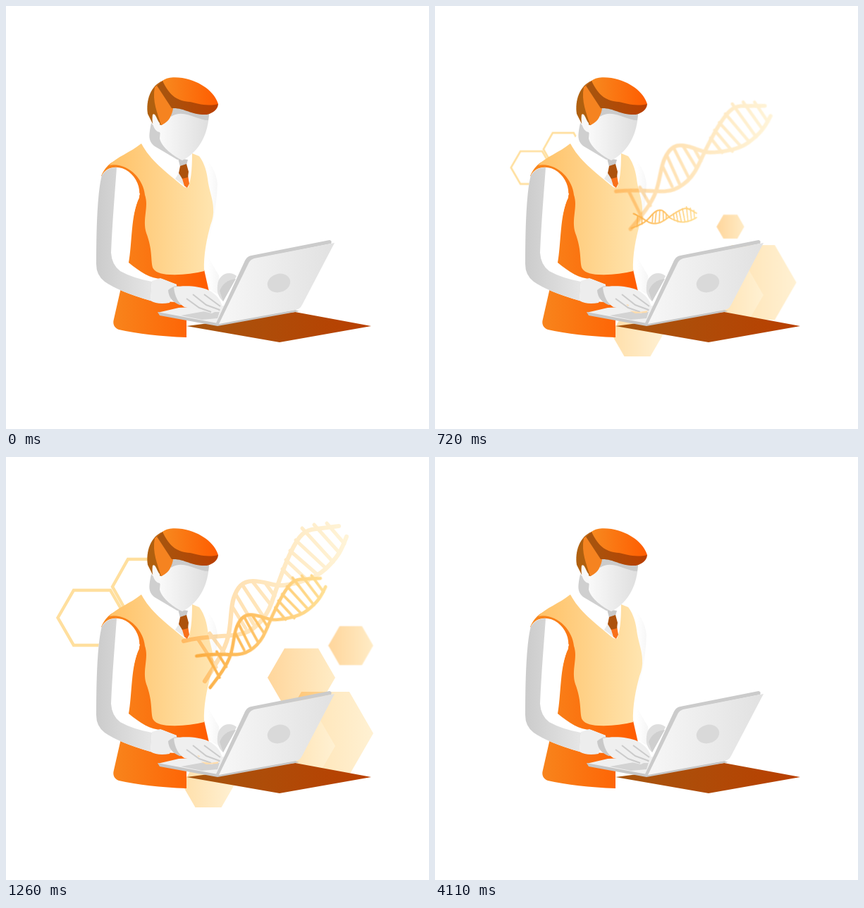
An HTML page that plays this animation: 600x600 px, repeating every 4.5 s.

```html
<!DOCTYPE html>
<html lang="en">
<head>
<meta charset="utf-8">
<title>Researcher at a laptop</title>
<style>
  html, body { margin: 0; width: 100%; height: 100%; overflow: hidden; background: #fff; }
  svg { display: block; width: 100%; height: 100%; }
  .glass { mix-blend-mode: multiply; }
</style>
</head>
<body>
<svg id="stage" viewBox="0 0 600 600">
  <defs>
    <linearGradient id="hexWarm"><stop stop-color="#ffd69c"/><stop offset="1" stop-color="#ffecc6"/></linearGradient>
    <linearGradient id="hexPale"><stop stop-color="#ffdfaa"/><stop offset="1" stop-color="#fff1d3"/></linearGradient>
    <linearGradient id="helixPale" gradientUnits="userSpaceOnUse" x1="252" x2="484" y1="0" y2="0">
      <stop stop-color="#ffd9a3"/><stop offset="1" stop-color="#fff4d8"/></linearGradient>
    <linearGradient id="helixGold" gradientUnits="userSpaceOnUse" x1="252" x2="484" y1="0" y2="0">
      <stop stop-color="#fbac40"/><stop offset=".5" stop-color="#ffc66c"/><stop offset="1" stop-color="#ffe096"/></linearGradient>
    <linearGradient id="vest"><stop stop-color="#ffc166"/><stop offset="1" stop-color="#ffe5b0"/></linearGradient>
    <linearGradient id="orange"><stop stop-color="#f7891f"/><stop offset="1" stop-color="#ff5c00"/></linearGradient>
    <linearGradient id="brown"><stop stop-color="#a6560f"/><stop offset="1" stop-color="#b93f00"/></linearGradient>
    <linearGradient id="face"><stop stop-color="#fafafa"/><stop offset="1" stop-color="#dedede"/></linearGradient>
    <linearGradient id="shade"><stop stop-color="#cbcbcb"/><stop offset="1" stop-color="#e6e6e6"/></linearGradient>
    <linearGradient id="lid"><stop stop-color="#f7f7f7"/><stop offset="1" stop-color="#e1e1e1"/></linearGradient>
    <linearGradient id="sleeve"><stop offset=".5" stop-color="#fff"/><stop offset="1" stop-color="#f5f5f5"/></linearGradient>

    <g id="helix" fill="none" stroke-linecap="round">
      <path stroke-width="5" d="M272 258L298 298M289 250L309 277M322 214L340 243M326 195L351 237
        M335 181L364 225M350 177L375 209M368 179L381 197
        M392 159L413 180M397 146L429 176M403 133L442 167M411 118L454 158M420 101L464 149M437 96L473 136M455 94L480 123"/>
      <path stroke-width="6.2" d="M252 261C285 253 309 255 329 252S368 232 377 206S392 160 404 135S424 103 440 102L472 98
        M282 318C297 295 310 275 315 255S318 215 323 200S335 176 350 176S375 181 386 182S435 176 453 159S476 132 483 113"/>
    </g>
  </defs>

  <g id="hexes"></g>
  <g id="rings" fill="none" stroke="#ffdf9e" stroke-width="4.4"></g>

  <g id="person">
    <path fill="url(#sleeve)" d="M270 208C286 215 298 232 300 252C299 290 290 320 284 352L302 382L303 410L284 400L270 300Z"/>
    <path fill="url(#orange)" d="M135 241C140 230 146 223 156 219L178 224L205 260L212 372L281 374L288 405L256 440V470Q200 468 160 459Q150 455 153 444L163 400L174 362C174 320 181 292 190 266Z"/>
    <path fill="url(#vest)" d="M192 195C176 208 157 214 146 226C172 221 195 245 197 268C203 285 193 302 199 322C208 346 205 358 208 371Q212 380 232 381Q258 382 281 376C280 352 285 330 290 311Q295 298 294 288C294 274 288 262 286 245C284 230 279 219 274 213L264 209L258 258Z"/>
    <path fill="#fff" d="M204 180L192 195C204 218 226 235 253 257L258 258Q264 245 264 210L250 217Z"/>
    <path fill="#e9e9e9" d="M247 234L240 245L254 256L251 244Z"/>
    <path fill="#c9c9c9" d="M244 216L258 218L256 225L247 228Z"/>
    <path fill="#f9701a" d="M249 242L258 240L260 252L257 258L253 255Z"/>
    <path fill="#ad520d" d="M247 227L256 224L259 235L258 243L250 245L245 237Z"/>

    <path fill="#cfcfcf" d="M206 166C202 185 202 192 211 199L243 218L252 216L226 188Z"/>
    <path fill="url(#face)" d="M220 164L234 145L288 152C287 178 277 205 250 219C238 213 221 201 218 188Z"/>
    <path fill="#cbcbcb" d="M232 145L250 143L288 153L287 162C270 162 252 145 234 157Z"/>
    <path fill="#b0600f" d="M223 106C205 112 198 135 201 153L208 167L221 169L235 148L232 120Z"/>
    <path fill="#f58320" d="M211 115L222 106L237 146C234 160 228 166 220 169C215 152 207 135 211 115Z"/>
    <path fill="url(#brown)" d="M222 106L301 139Q300 150 285 154C262 155 254 144 235 145L214 113Z"/>
    <path fill="url(#orange)" d="M222 106C230 100 241 101 250 102C277 107 296 122 301 139C285 143 270 138 261 136C244 135 232 128 222 106Z"/>
    <path fill="#f8f8f8" d="M208 154C212 150 214 162 218 166L219 179C211 179 206 168 208 154Z"/>

    <path fill="#fff" d="M136 240C143 227 161 225 174 235C185 244 191 256 189 272C177 295 179 338 174 364C190 377 205 387 221 387L242 395V420L205 418Q160 405 140 391Q128 382 128 366Q128 270 136 240Z"/>
    <path fill="url(#shade)" d="M136 240Q145 228 157 229C154 270 151 305 149 350Q150 367 162 376Q180 386 207 391L205 418Q160 405 140 391Q128 382 128 366Q128 270 136 240Z"/>
    <path fill="#ededed" d="M207 390L219 386L242 395L232 421Q215 424 205 418Z"/>
  </g>

  <path fill="url(#brown)" d="M256 454L410 434L518 454L388 477Z"/>
  <g id="laptop">
    <path fill="#dedede" d="M300 397C301 379 318 375 327 383L308 419C301 412 299 406 300 397Z"/>
    <path fill="#cfcfcf" d="M303 404Q309 389 326 387L308 419Z"/>
    <path fill="#f0f0f0" d="M215 435L245 428L312 425L300 453Z"/>
    <path fill="#c6c6c6" d="M215 434L300 450L410 431L416 433L300 454L218 439Z"/>
    <path fill="#d3d3d3" d="M248 439L276 434L304 430L300 443L278 445Z"/>
    <path fill="#c9c9c9" d="M230 403Q239 395 247 398L262 424L246 424Q231 418 230 403Z"/>
    <path fill="#efefef" d="M238 399C252 396 274 397 287 403C299 409 305 417 307 428Q302 431 299 429L304 434L296 434L292 436Q268 430 253 427Q240 419 238 399Z"/>
    <path fill="none" stroke="#cbcbcb" stroke-width="2" d="M265 409L284 424L303 431M281 409L304 426M256 415L274 428L291 434"/>
    <path fill="#cbcbcb" d="M297 452L339 361Q342 355 348 354L459 332Q463 333 461 337L351 359L304 452Z"/>
    <path fill="url(#lid)" d="M302 451L344 365Q346 360 352 358L466 336L420 424Q417 430 411 431Z"/>
    <ellipse cx="387" cy="393" rx="16.5" ry="13" fill="#d9d9d9" transform="rotate(-18 387 393)"/>
  </g>
  <path id="keys" fill="#ffdcab" d="M271 423L275 424L274 426ZM276 432L290 434L302 432L300 435L284 436Z"/>

  <g id="helixBack" class="glass"><use href="#helix" stroke="url(#helixPale)"/></g>
  <g id="helixFront">
    <use href="#helix" stroke="url(#helixGold)" transform="translate(280 305) rotate(3.3) scale(.772) translate(-267 -290)"/>
  </g>
</svg>

<script>
const LOOP = 4500;
const byId = id => document.getElementById(id);

function hexagon(parent, cx, cy, rx, ry = rx * 0.866, top = rx / 2) {
  const p = document.createElementNS('http://www.w3.org/2000/svg', 'polygon');
  p.setAttribute('points', [
    [cx - rx, cy], [cx - top, cy - ry], [cx + top, cy - ry],
    [cx + rx, cy], [cx + top, cy + ry], [cx - top, cy + ry]
  ].join(' '));
  return parent.appendChild(p);
}

// Grow from a pivot, hold, then shrink back into it.
function grow(el, [x, y], start, length, { turn = 0, leave = 3615, gone = 4085 } = {}) {
  el.style.transformOrigin = `${x}px ${y}px`;
  const step = (time, size, easing = 'linear') => ({
    offset: time / LOOP,
    transform: `rotate(${turn * (1 - size)}deg) scale(${size})`,
    easing
  });
  el.animate([
    step(0, 0), step(start, 0, 'ease'), step(start + length, 1),
    step(leave, 1, 'cubic-bezier(.5,0,.85,.6)'), step(gone, 0), step(LOOP, 0)
  ], { duration: LOOP, iterations: Infinity });
}

// center x, y, radius, pivot, start, length, fill
const hexes = [
  [287, 465, 37, [287, 465], 20, 730, 'hexPale'],
  [453, 392, 68, [438, 394], 255, 750, 'hexPale'],
  [423, 410, 44, [423, 410], 130, 750, 'hexPale'],
  [419, 313, 48, [419, 313], 548, 690, 'hexWarm'],
  [489, 267.5, 36, [489, 267.5], 830, 720, 'hexWarm']
];
for (const [x, y, r, pivot, start, length, fill] of hexes) {
  const hex = hexagon(byId('hexes'), x, y, r);
  hex.setAttribute('fill', `url(#${fill})`);
  hex.classList.toggle('glass', fill === 'hexWarm');
  grow(hex, pivot, start, length);
}

hexagon(byId('rings'), 122, 228, 48.5, 39, 26);
hexagon(byId('rings'), 198, 184, 47, 39, 25);
grow(byId('rings'), [158, 231], 470, 730);
grow(byId('keys'), [287, 465], 20, 730);

grow(byId('helixBack'), [267, 290], 115, 1000, { turn: 60, leave: 3660, gone: 4110 });
grow(byId('helixFront'), [280, 305], 475, 960, { turn: 57, leave: 3660, gone: 4110 });
</script>
</body>
</html>
```
